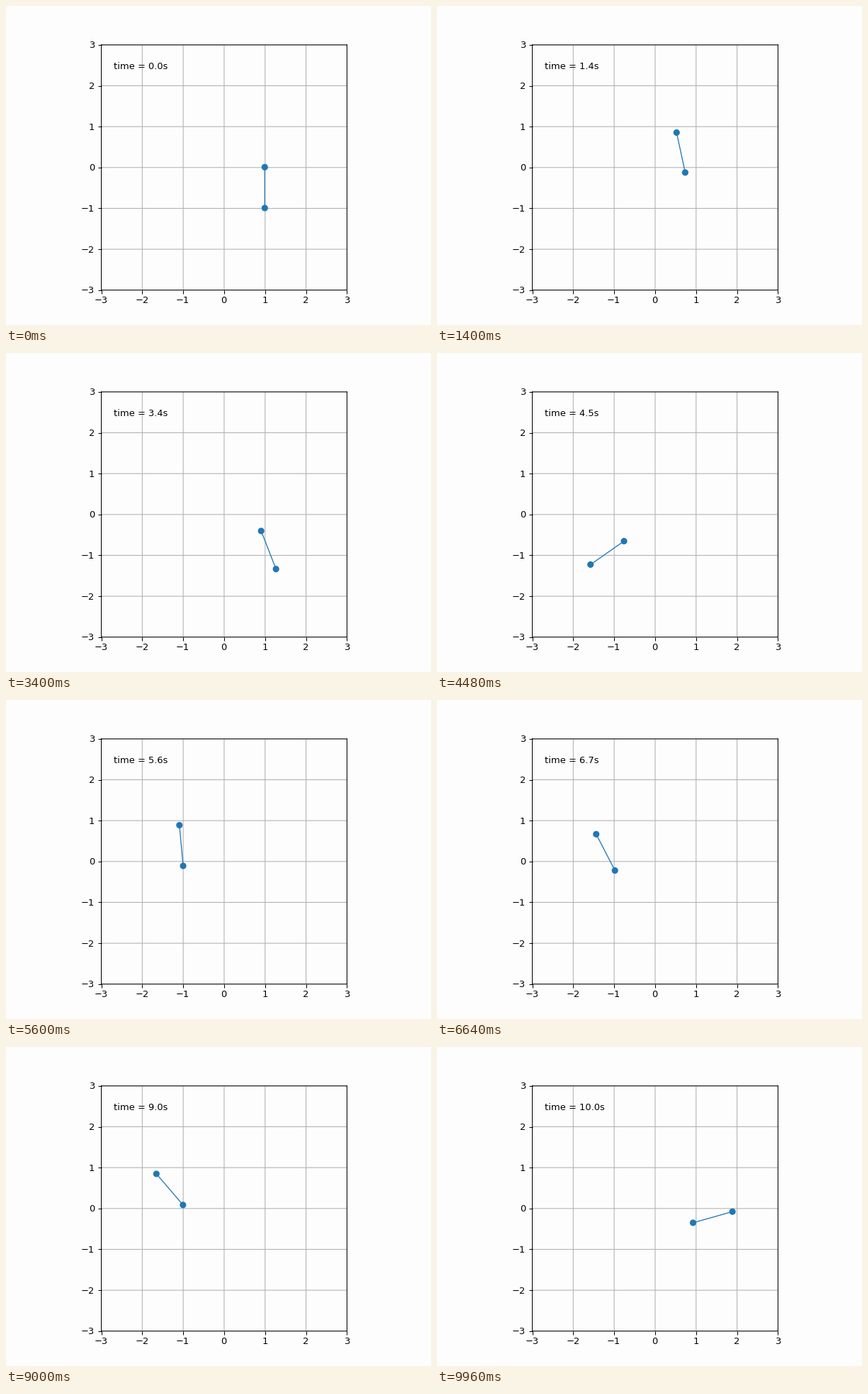
Recreate the animation shown at these times as a matplotlib script. Size 600x450 px, loop 10 s.

```python
import numpy as np
import matplotlib.pyplot as plt
from matplotlib.animation import FuncAnimation
from matplotlib.transforms import ScaledTranslation

# Damped pendulum whose pivot speeds up around the unit circle
G = 9.81
DAMPING = 0.5
LENGTH = 1.0

FRAMES = 250
INTERVAL = 40
SKIP = 4      # samples per drawn frame
OFFSET = 2    # first drawn sample
SUBSTEPS = 8
PAPER = "#fefdfe"

times = np.linspace(0, 10, 1000)


def derivs(t, state):
    theta, omega = state
    phi = t * t / 2
    s, c = np.sin(phi), np.cos(phi)
    acc_x = -s - t * t * c
    acc_y = c - t * t * s
    pull = acc_x * np.cos(theta) + (G + acc_y) * np.sin(theta)
    return np.array([omega, -pull / LENGTH - DAMPING * omega])


def rk4(t, state, h):
    k1 = derivs(t, state)
    k2 = derivs(t + h / 2, state + h / 2 * k1)
    k3 = derivs(t + h / 2, state + h / 2 * k2)
    k4 = derivs(t + h, state + h * k3)
    return state + h / 6 * (k1 + 2 * k2 + 2 * k3 + k4)


def solve():
    state = np.zeros(2)
    thetas = [0.0]
    h = (times[1] - times[0]) / SUBSTEPS
    for t in times[:-1]:
        for j in range(SUBSTEPS):
            state = rk4(t + j * h, state, h)
        thetas.append(state[0])
    return np.array(thetas)


theta = solve()
pivot_x, pivot_y = np.cos(times**2 / 2), np.sin(times**2 / 2)
bob_x = pivot_x + LENGTH * np.sin(theta)
bob_y = pivot_y - LENGTH * np.cos(theta)

plt.rcParams["font.family"] = "DejaVu Sans"
plt.rcParams["path.snap"] = False   # soft lines at subpixel places

# Layout in units of a 640 x 480 page
left, right, bottom, top = 143.5, 513.5, 52.5, 421.5
fig = plt.figure(figsize=(6.4, 4.8), dpi=93.75, facecolor=PAPER)
ax = fig.add_axes([left / 640, bottom / 480,
                   (right - left) / 640, (top - bottom) / 480],
                  facecolor=PAPER, xlim=(-3, 3), ylim=(-3, 3))
ax.set_xticks(range(-3, 4))
ax.set_yticks(range(-3, 4))
ax.grid()

# The frame and grid sit half a unit right of and below the content
nudge = ScaledTranslation(-0.005, 0.005, fig.dpi_scale_trans)
for text in ax.get_xticklabels() + ax.get_yticklabels():
    text.set_transform(text.get_transform() + nudge)

place = ax.transData + nudge
rod, = ax.plot([], [], color="C0", lw=1, transform=place)
# One width per dot keeps the dots from being rounded to whole pixels
dots = ax.scatter([0, 0], [0, 0], s=36, color="C0", linewidths=[1, 1],
                  zorder=2, transform=place)
label = ax.text(0.05, 0.9, "", transform=ax.transAxes)


def update(frame):
    i = SKIP * frame + OFFSET
    xs, ys = [pivot_x[i], bob_x[i]], [pivot_y[i], bob_y[i]]
    rod.set_data(xs, ys)
    dots.set_offsets(np.column_stack([xs, ys]))
    label.set_text(f"time = {times[i]:.1f}s")
    return rod, dots, label


anim = FuncAnimation(fig, update, frames=FRAMES, interval=INTERVAL,
                     init_func=lambda: update(0), repeat=True,
                     repeat_delay=0, blit=False)
plt.show()
```
